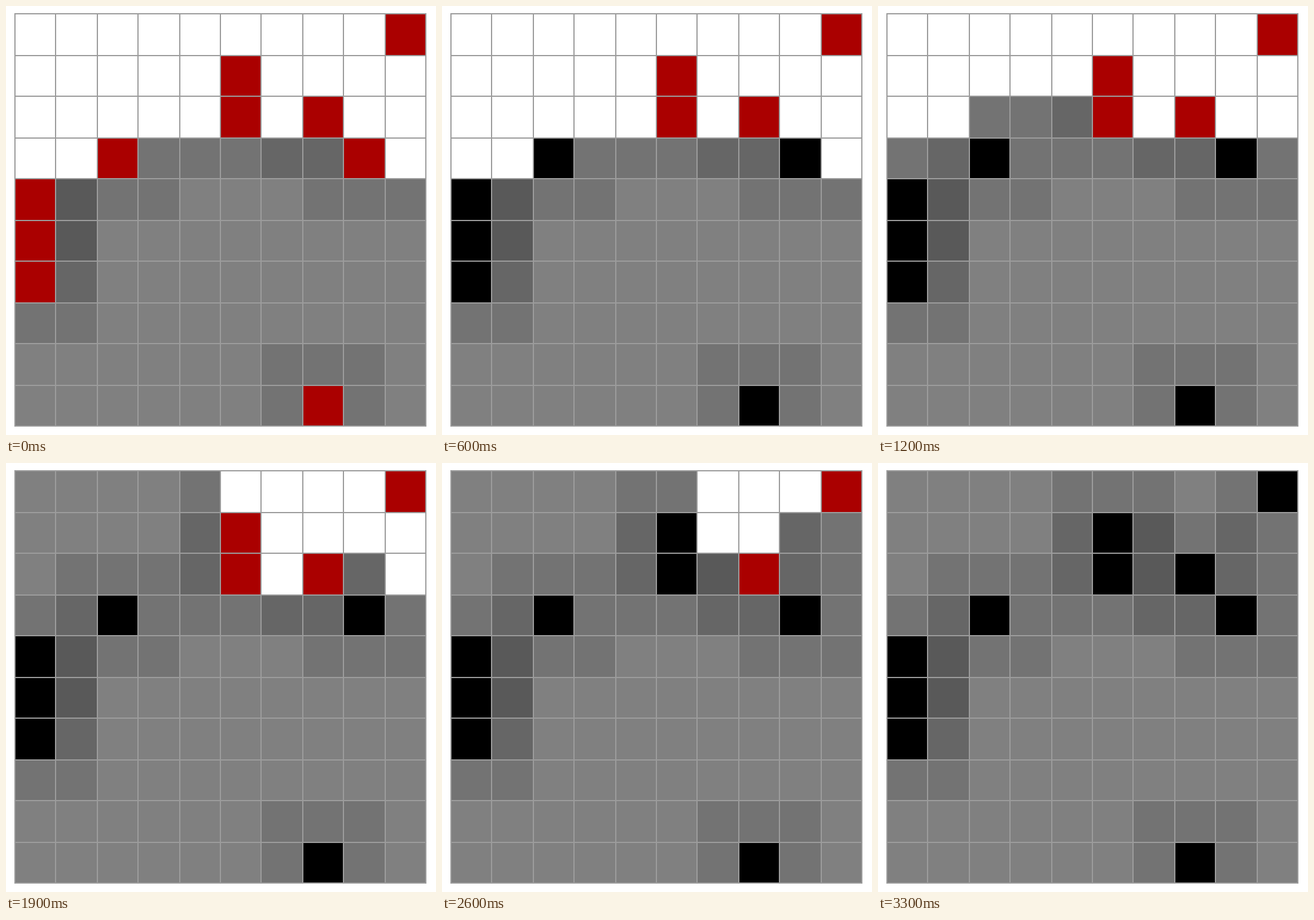
Animation of 720 by 718 pixels, one loop 3.4 s. Source, as an HTML page with a canvas:

```html
<!DOCTYPE html>
<html lang="en">
<head>
<meta charset="utf-8">
<title>Minefield solver</title>
<style>
  html, body { margin: 0; width: 100%; height: 100%; overflow: hidden; background: #fff; }
  canvas { display: block; }
</style>
</head>
<body>
<canvas id="board" width="720" height="718"></canvas>
<script>
const SIZE = 10, TICK = 100, LOOP = 3400;
const LINE = '#9c9c9c', HIDDEN_MINE = '#aa0000', FLAGGED = '#000';
const ctx = document.getElementById('board').getContext('2d');

// Cells are written as column and row digits.
const mines = new Set('90 51 52 72 23 83 04 05 06 79'.split(' '));

// Solver moves, one per tick; each entry starts at the given tick.
const moves = new Map();
const plan = (tick, cells) => cells.split(' ').forEach((cell, i) => moves.set(tick + i, cell));
plan(1, '06 05 04 23 79 83');
plan(7, '03 13 22 32 42 93');
plan(13, '02');
plan(19, '82 92 81 91 52 51');
plan(25, '50 62 72 61 60 71');
plan(31, '70');
plan(33, '90');

const lineX = i => 2 * Math.round(7 + 34.4 * i);
const lineY = i => 2 * Math.round(6 + 34.5 * i);

function neighbours(cell) {
  const [x, y] = [...cell].map(Number), list = [];
  for (let i = x - 1; i <= x + 1; i++)
    for (let j = y - 1; j <= y + 1; j++)
      if (i >= 0 && j >= 0 && i < SIZE && j < SIZE && (i !== x || j !== y)) list.push(`${i}${j}`);
  return list;
}

const count = cell => neighbours(cell).filter(n => mines.has(n)).length;

function reveal(cell, known) {
  if (known.has(cell)) return;
  known.add(cell);
  if (!mines.has(cell) && count(cell) === 0) neighbours(cell).forEach(n => reveal(n, known));
}

function startingCells() {
  const known = new Set();
  for (let y = 3; y < SIZE; y++)
    for (let x = 0; x < SIZE; x++)
      if (!mines.has(`${x}${y}`) && (y > 3 || (x > 2 && x < 8))) known.add(`${x}${y}`);
  return known;
}

function colour(cell, known) {
  if (mines.has(cell)) return known.has(cell) ? FLAGGED : HIDDEN_MINE;
  if (!known.has(cell)) return '#fff';
  const shade = Math.floor(128 * (1 - count(cell) / 10));
  return `rgb(${shade},${shade},${shade})`;
}

function draw(tick) {
  const known = startingCells();
  for (const [at, cell] of moves) if (at <= tick) reveal(cell, known);

  ctx.fillStyle = '#fff';
  ctx.fillRect(0, 0, 720, 718);
  ctx.fillStyle = LINE;
  ctx.fillRect(lineX(0), lineY(0), lineX(SIZE) + 2 - lineX(0), lineY(SIZE) + 2 - lineY(0));
  for (let x = 0; x < SIZE; x++)
    for (let y = 0; y < SIZE; y++) {
      const left = lineX(x) + 2, top = lineY(y) + 2;
      ctx.fillStyle = colour(`${x}${y}`, known);
      ctx.fillRect(left, top, lineX(x + 1) - left, lineY(y + 1) - top);
    }
}

let start, shown = 0;
function frame(now) {
  start ??= now;
  const tick = Math.floor(((now - start) % LOOP) / TICK);
  if (tick !== shown) draw(shown = tick);
  requestAnimationFrame(frame);
}
draw(0);
requestAnimationFrame(frame);
</script>
</body>
</html>
```
